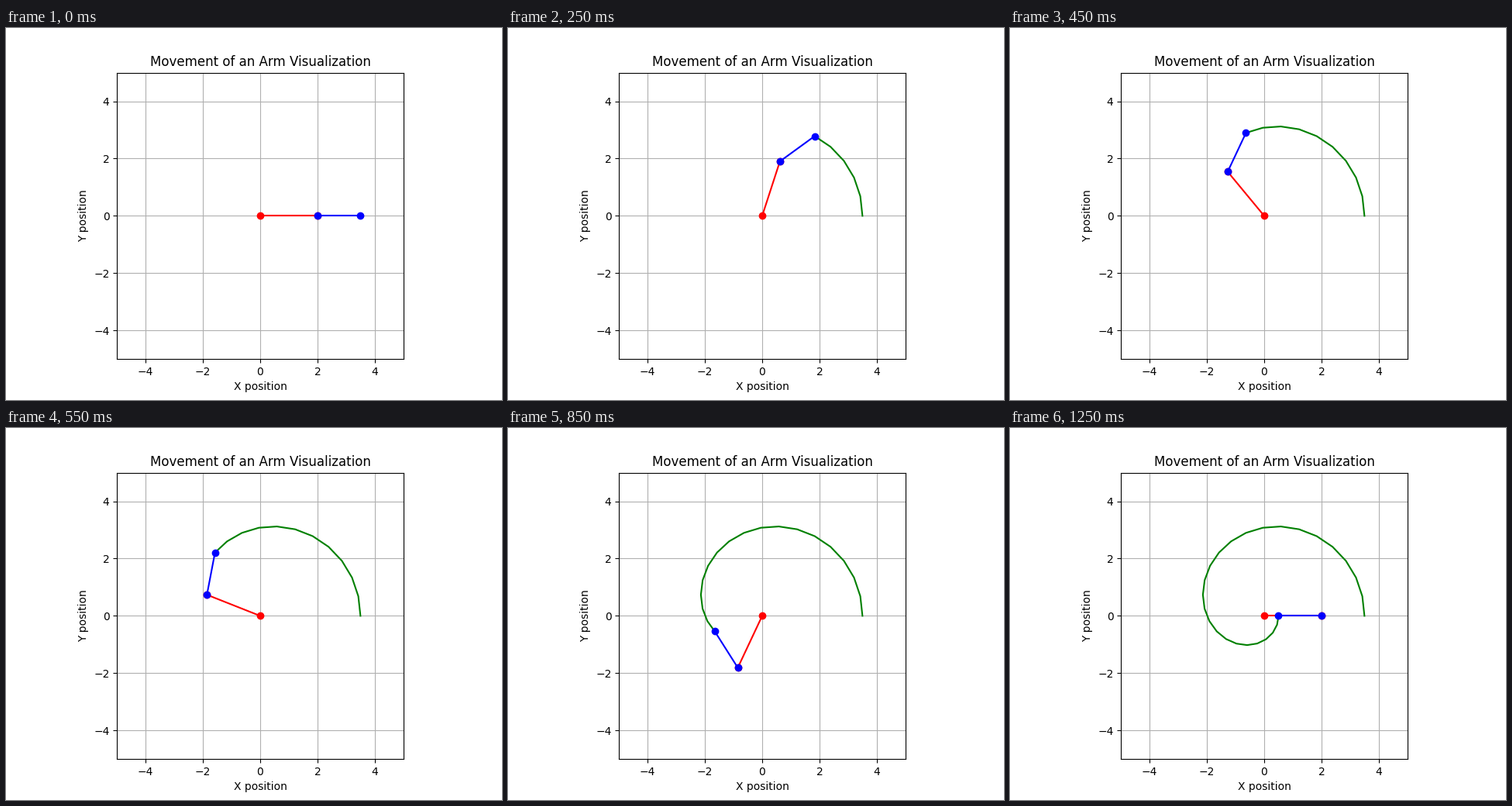
Write a matplotlib script that moves like this. It is 640 px wide and 480 px high and loops after 1.3 s.

```python
import numpy as np
import matplotlib.pyplot as plt
from matplotlib.animation import FuncAnimation

FRAMES = 26
INTERVAL = 50
UPPER, LOWER = 2.0, 1.5

# The upper arm makes a full turn while the forearm makes half a turn.
turn = np.linspace(0, 2 * np.pi, FRAMES)
elbow_x, elbow_y = UPPER * np.cos(turn), UPPER * np.sin(turn)
hand_x = elbow_x + LOWER * np.cos(turn / 2)
hand_y = elbow_y + LOWER * np.sin(turn / 2)

fig, ax = plt.subplots(figsize=(6.4, 4.8), dpi=100)
ax.set_xlim(-5, 5)
ax.set_ylim(-5, 5)
ax.set_aspect("equal")
ax.grid(True)
ax.set_title("Movement of an Arm Visualization")
ax.set_xlabel("X position")
ax.set_ylabel("Y position")

trail, = ax.plot([], [], color="green")
upper_arm, = ax.plot([], [], "o-", color="red")
forearm, = ax.plot([], [], "o-", color="blue")


def update(i):
    upper_arm.set_data([0, elbow_x[i]], [0, elbow_y[i]])
    forearm.set_data([elbow_x[i], hand_x[i]], [elbow_y[i], hand_y[i]])
    trail.set_data(hand_x[:i + 1], hand_y[:i + 1])
    return trail, upper_arm, forearm


anim = FuncAnimation(fig, update, frames=FRAMES, interval=INTERVAL,
                     repeat=True, repeat_delay=0)
plt.show()
```
